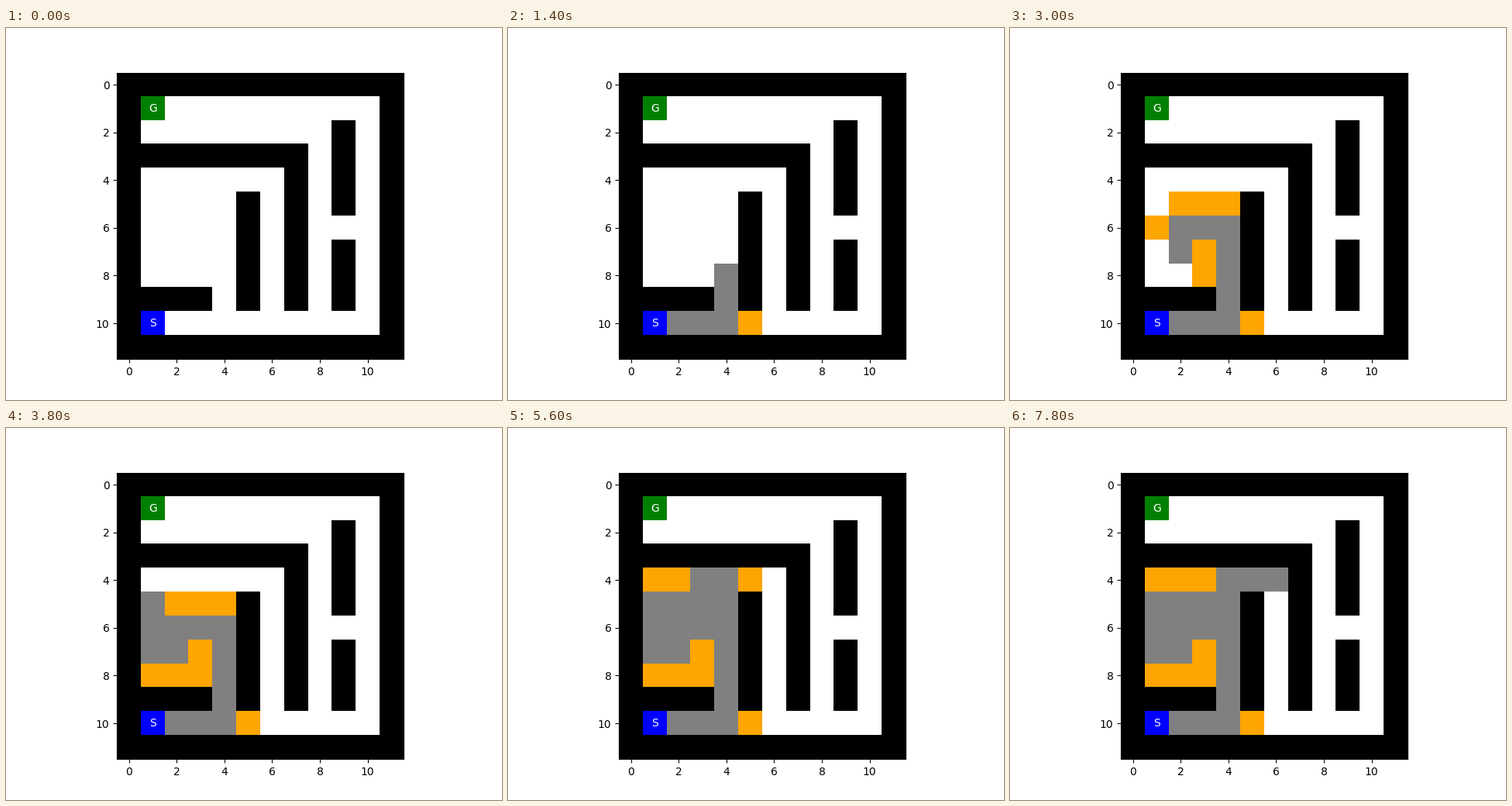
Recreate the animation shown at these times as a matplotlib script. Size 640 by 480 pixels, loop 8000 ms.

```python
import numpy as np
import matplotlib.pyplot as plt
from matplotlib.animation import FuncAnimation
from matplotlib.colors import to_rgb

SIZE = 12
STEP_MS = 200
STEPS = 40
START, GOAL = (1, 10), (1, 1)
LOOK_AT = 0.4  # part of a move after which the neighbours are seen

# Corners of the searcher's walk, including the retreat from a dead end.
CORNERS = [START, (4, 10), (4, 6), (2, 6), (2, 7), (1, 7),
           (1, 5), (4, 5), (4, 4), (1, 4), (6, 4)]
# Pace: number of moves made by a given step.
PACE = ([0, 3, 11, 19, 23, 32, 35, 37, 39],
        [0, 3, 7, 13, 16, 20, 21, 22, 25])


def build_walls():
    walls = np.zeros((SIZE, SIZE), bool)
    walls[[0, -1]] = walls[:, [0, -1]] = True
    walls[3, 1:8] = walls[9, 1:4] = True
    walls[3:10, 7] = walls[5:10, 5] = True
    walls[2:10, 9] = True
    walls[6, 9] = False
    return walls


def build_walk():
    walk = [START]
    for x1, y1 in CORNERS[1:]:
        while walk[-1] != (x1, y1):
            x, y = walk[-1]
            walk.append((int(x + np.sign(x1 - x)), int(y + np.sign(y1 - y))))
    return walk


WALLS, WALK = build_walls(), build_walk()


def paint(grid, cells, color):
    for x, y in cells:
        grid[y, x] = to_rgb(color)


def open_neighbours(x, y):
    near = ((x + 1, y), (x - 1, y), (x, y + 1), (x, y - 1))
    return [(i, j) for i, j in near if not WALLS[j, i]]


def current_path(moves):
    path = []
    for cell in WALK[:moves + 1]:
        if cell in path:
            del path[path.index(cell):]
        path.append(cell)
    return path


def grid_at(step):
    moves = np.interp(step, *PACE) + 1e-9
    grid = np.repeat(np.where(WALLS, 0.0, 1.0)[:, :, None], 3, axis=2)
    for cell in WALK[:int(moves + 1 - LOOK_AT)]:
        paint(grid, open_neighbours(*cell), "orange")
    paint(grid, current_path(int(moves)), "gray")
    paint(grid, [START], "blue")
    paint(grid, [GOAL], "green")
    return grid


fig, ax = plt.subplots(figsize=(6.4, 4.8), dpi=100)
image = ax.imshow(grid_at(0), interpolation="nearest")
for label, (x, y) in (("S", START), ("G", GOAL)):
    ax.text(x, y, label, color="white", ha="center", va="center")


def update(step):
    image.set_data(grid_at(step))
    return (image,)


anim = FuncAnimation(fig, update, frames=STEPS, interval=STEP_MS,
                     repeat=True, repeat_delay=0)
plt.show()
```
